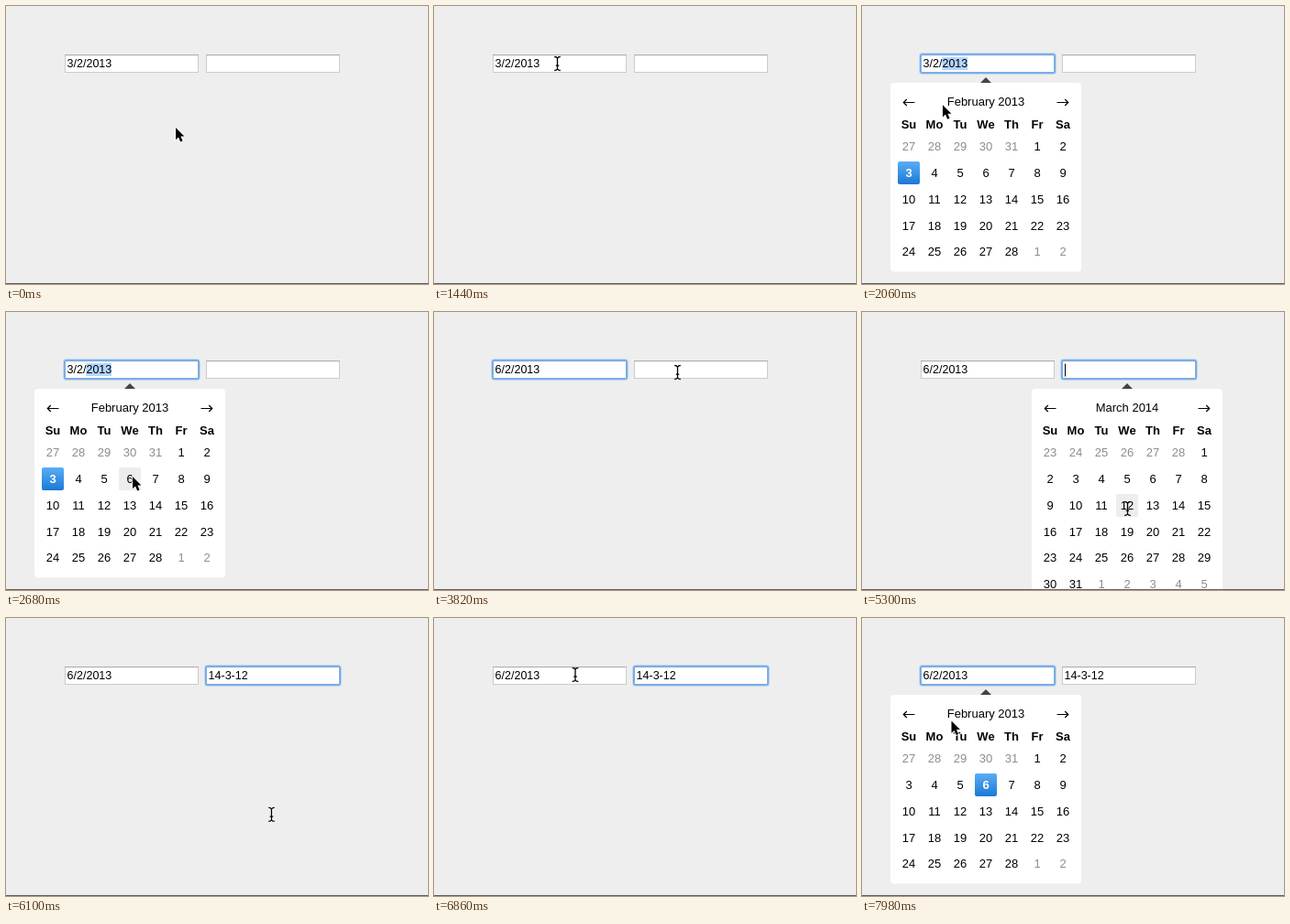
An HTML page for the animation above (8 s loop, 460 by 304 pixels).

```html
<!DOCTYPE html>
<html lang="en">
<head>
<meta charset="utf-8">
<title>Date picker</title>
<style>
  html, body { margin: 0; width: 100%; height: 100%; overflow: hidden; background: #eee; }
  svg { display: block; width: 460px; height: 304px; }
  text { font-family: "Liberation Sans", Arial, sans-serif; font-size: 13px; fill: #000; }
  .mid { text-anchor: middle; }
  .head { font-weight: bold; }
  .mute { fill: #8c8c8c; }
  .on { fill: #fff; }
  .value { font-size: 12.5px; }
  .line { fill: none; stroke: #000; stroke-width: 1.2; }
</style>
</head>
<body>
<svg id="stage" viewBox="0 0 460 304">
  <defs>
    <linearGradient id="blue" x1="0" y1="0" x2="0" y2="1">
      <stop offset="0" stop-color="#5aaef5"/>
      <stop offset="1" stop-color="#1a78d6"/>
    </linearGradient>
  </defs>
</svg>
<script>
const LOOP = 8000;
const stage = document.getElementById('stage');

function add(parent, tag, attrs, text) {
  const el = document.createElementNS('http://www.w3.org/2000/svg', tag);
  for (const k in attrs) el.setAttribute(k, attrs[k]);
  if (text !== undefined) el.textContent = text;
  parent.appendChild(el);
  return el;
}
const show = (el, on) => el.setAttribute('visibility', on ? 'visible' : 'hidden');
const move = (el, x, y) => el.setAttribute('transform', `translate(${x.toFixed(2)} ${y.toFixed(2)})`);

function makeField(x) {
  const g = add(stage, 'g', { transform: `translate(${x} 53)` });
  add(g, 'rect', { width: 146, height: 20, fill: '#fff' });
  add(g, 'rect', { x: .5, y: .5, width: 145, height: 19, fill: 'none', stroke: '#cbcbcb' });
  add(g, 'path', { d: 'M0 .5H146', stroke: '#b0b0b0' });
  add(g, 'path', { d: 'M1 1.5H145', stroke: '#f0f0f0' });
  const ring = add(g, 'g', { fill: 'none' });
  add(ring, 'rect', { x: -1.5, y: -1.5, width: 149, height: 23, rx: 3, stroke: '#c0d7f0' });
  add(ring, 'rect', { x: 0, y: 0, width: 146, height: 20, rx: 1.5, stroke: '#7aade5', 'stroke-width': 2 });
  const mark = add(g, 'rect', { y: 3, height: 14, fill: '#b4d5fe' });
  const text = add(g, 'text', { x: 2.6, y: 14.3, class: 'value' });
  const caret = add(g, 'rect', { y: 3.5, width: 1, height: 14, fill: '#000' });
  return { ring, mark, text, caret };
}

// first: leading day of the previous month, whose length is prevLen
function makePicker(x, title, first, prevLen, len, rows, selected) {
  const g = add(stage, 'g', { transform: `translate(${x} 84)` });
  add(g, 'path', { d: 'M98 0L104 -6L110 0Z', fill: '#444' });
  add(g, 'rect', { width: 208, height: rows * 28.8 + 62.5, rx: 4, fill: '#fff' });
  const hover = add(g, 'rect', { width: 24, height: 25, rx: 2, fill: '#ededed' });
  add(g, 'path', { class: 'line', d: 'M26.5 21.5H14.5M17.8 18L14.3 21.5L17.8 25' });
  add(g, 'path', { class: 'line', d: 'M181.5 21.5H193.5M190.2 18L193.7 21.5L190.2 25' });
  add(g, 'text', { x: 104, y: 24.6, class: 'mid' }, title);
  ['Su', 'Mo', 'Tu', 'We', 'Th', 'Fr', 'Sa'].forEach((d, i) =>
    add(g, 'text', { x: 20 + i * 28, y: 49.7, class: 'mid head' }, d));
  const lead = prevLen - first + 1;
  for (let i = 0; i < rows * 7; i++) {
    const n = i - lead + 1;
    const inside = n > 0 && n <= len;
    const day = n < 1 ? n + prevLen : n > len ? n - len : n;
    const cx = 20 + i % 7 * 28, cy = 69.3 + Math.floor(i / 7) * 28.9;
    const on = inside && day === selected;
    if (on) add(g, 'rect', { x: cx - 12, y: cy - 12.2, width: 24, height: 25, rx: 2, fill: 'url(#blue)' });
    add(g, 'text', { x: cx, y: cy + 4.5, class: 'mid ' + (on ? 'on head' : inside ? '' : 'mute') }, day);
  }
  return { g, hover, x, rows };
}

function setHover(p, x, y) {
  const col = Math.floor((x - p.x - 6) / 28);
  const row = Math.floor((y - 84 - 55) / 28.9);
  const dx = x - p.x - 8 - col * 28;
  const hit = col >= 0 && col < 7 && row >= 0 && row < p.rows && dx >= 0 && dx <= 24;
  p.hover.setAttribute('opacity', hit ? 1 : 0);
  if (hit) move(p.hover, 8 + col * 28, 57.1 + row * 28.9);
}

const fieldA = makeField(64), fieldB = makeField(218);
const pickers = [
  { p: makePicker(31, 'February 2013', 27, 31, 28, 5, 3), from: 1480, to: 3060 },
  { p: makePicker(185, 'March 2014', 23, 28, 31, 6, 0), from: 4120, to: 5480 },
  { p: makePicker(31, 'February 2013', 27, 31, 28, 5, 6), from: 7220, to: LOOP }
];
add(stage, 'rect', { y: 303, width: 460, height: 1, fill: '#000', opacity: .6 });

const arrow = add(stage, 'g', {});
add(arrow, 'path', {
  d: 'M0 0V13.2L3 10.4L5.2 15.6L7.6 14.6L5.4 9.6H9.4Z',
  fill: '#000', stroke: '#fff', 'stroke-width': 1.6, 'stroke-linejoin': 'round', 'paint-order': 'stroke'
});
const beam = add(stage, 'g', { fill: 'none' });
const beamPath = 'M-3.3 -7.5Q-.6 -7.5 0 -5.8Q.6 -7.5 3.3 -7.5M0 -5.8V5.8' +
  'M-3.3 7.5Q-.6 7.5 0 5.8Q.6 7.5 3.3 7.5M-1.8 2.2H1.8';
add(beam, 'path', { d: beamPath, stroke: '#fff', 'stroke-width': 2.6, opacity: .6 });
add(beam, 'path', { d: beamPath, stroke: '#000', 'stroke-width': 1.3 });

// time, x, y
const path = [
  [0, 185, 133], [420, 134.5, 63], [1440, 134.5, 63],
  [1800, 90, 67], [2150, 92, 122], [2680, 138, 180], [3060, 138, 181],
  [3820, 265.5, 66], [4380, 265.5, 66], [4580, 258.5, 188], [4820, 264, 220],
  [5200, 289.5, 215], [6090, 289.5, 215], [6860, 154, 62],
  [7420, 154, 62], [7980, 97.5, 112.5], [8000, 97.5, 112.5]
];

function slope(i, k) {
  const a = path[i - 1], b = path[i], c = path[i + 1];
  if (!a || !c) return 0;
  const still = (p, q) => Math.abs(p[1] - q[1]) + Math.abs(p[2] - q[2]) < 2;
  return still(a, b) || still(b, c) ? 0 : (c[k] - a[k]) / (c[0] - a[0]);
}

function pointer(t) {
  let i = 0;
  while (i < path.length - 2 && t >= path[i + 1][0]) i++;
  const a = path[i], b = path[i + 1], d = b[0] - a[0];
  const u = (t - a[0]) / d, u2 = u * u, u3 = u2 * u;
  return [1, 2].map(k =>
    a[k] * (2 * u3 - 3 * u2 + 1) + b[k] * (3 * u2 - 2 * u3) +
    d * (slope(i, k) * (u3 - 2 * u2 + u) + slope(i + 1, k) * (u3 - u2)));
}

const within = (t, a, b) => t >= a && t < b;

function draw(t) {
  const [x, y] = pointer(t);
  const overField = y > 53 && y < 73 && (within(x, 64, 210) || within(x, 218, 364));
  const useBeam = overField || within(t, 1440, 2000) || within(t, 4080, 6110);
  show(beam, useBeam);
  show(arrow, !useBeam);
  move(useBeam ? beam : arrow, x, y);

  fieldA.text.textContent = t < 3080 ? '3/2/2013' : '6/2/2013';
  fieldB.text.textContent = t < 5520 ? '' : '14-3-12';
  show(fieldA.ring, within(t, 1460, 4080) || t >= 7200);
  show(fieldB.ring, within(t, 4080, 7200));

  // dragging selects whole digits from the end of the year
  const step = 6.95;
  const count = t > 1800 ? 4 : Math.max(0, Math.min(4, Math.round((115.1 - x) / step)));
  show(fieldA.mark, within(t, 1480, 3080));
  fieldA.mark.setAttribute('x', 51.1 - count * step);
  fieldA.mark.setAttribute('width', count * step);

  fieldA.caret.setAttribute('x', 52);
  fieldB.caret.setAttribute('x', 3);
  show(fieldA.caret, within(t, 7220, 7700));
  show(fieldB.caret, within(t, 4080, 4800) || within(t, 5300, 5480));

  for (const { p, from, to } of pickers) {
    const open = within(t, from, to);
    p.g.style.display = open ? '' : 'none';
    if (open) setHover(p, x, y);
  }
}

const start = performance.now();
function tick() {
  draw((performance.now() - start) % LOOP);
  requestAnimationFrame(tick);
}
draw(0);
requestAnimationFrame(tick);
</script>
</body>
</html>
```
